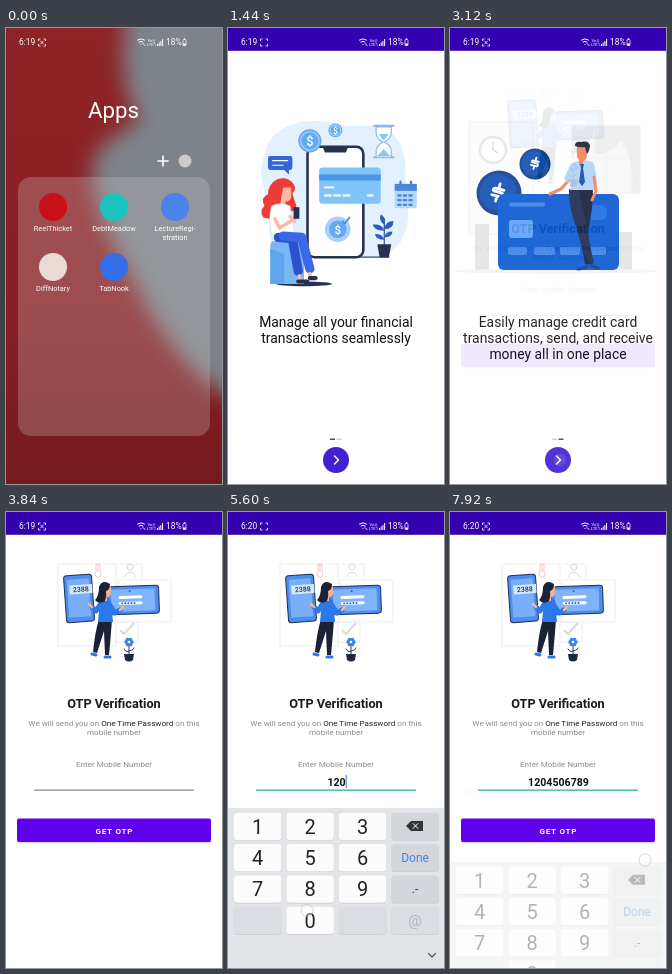
An HTML page for the animation above (8000 ms loop, 216 by 456 pixels).

```html
<!DOCTYPE html>
<html lang="en">
<head>
<meta charset="utf-8">
<title>Wallet app walkthrough</title>
<style>
html, body { margin: 0; width: 100%; height: 100%; overflow: hidden; background: #fff }
svg { display: block; width: 100vw; height: 100vh }
text { font-family: Roboto, sans-serif; text-anchor: middle }
.line { fill: none; stroke-linecap: round; stroke-linejoin: round }
.lead { font-size: 13.9px; fill: #111 }
.note { font-size: 8.1px; fill: #8a8a8a }
.label { font-size: 7.4px; fill: #fff }
.status { font-size: 8.4px; fill: #fff; text-anchor: start }
</style>
</head>
<body>
<svg viewBox="0 0 216 456">
<defs>
  <linearGradient id="red" x2="0" y2="1"><stop stop-color="#8d2428"/><stop offset=".6" stop-color="#8a1f23"/><stop offset="1" stop-color="#741a1d"/></linearGradient>
  <filter id="soft" x="-40%" y="-30%" width="180%" height="160%"><feGaussianBlur stdDeviation="10"/></filter>
  <clipPath id="frame"><rect id="frameBox" width="216" height="456"/></clipPath>
</defs>

<g id="home">
  <rect width="216" height="456" fill="url(#red)"/>
  <path filter="url(#soft)" fill="#7d8389" d="M124-30C114 20 114 66 134 92C116 106 90 112 86 142C88 190 112 222 132 262C152 304 180 340 216 366L260 380V-30Z"/>
  <g id="folder">
    <text x="107.500" y="90" font-size="22.300" fill="#fff">Apps</text>
    <path class="line" stroke="#fff" stroke-width="1.600" d="M152 133h10M157 128v10"/>
    <circle cx="179" cy="133" r="6.500" fill="#cfcaca"/>
    <rect x="12" y="149" width="192" height="259" rx="13" fill="#d0c8c8" fill-opacity=".27"/>
    <g id="icons"></g>
  </g>
</g>

<g id="app" clip-path="url(#frame)">
  <rect width="216" height="456" fill="#fff"/>
  <g id="intro">
    <g id="page1">
      <g transform="translate(108 228) scale(1.163) translate(-107.5 -230)">
        <path fill="#e3f0fd" d="M46 142C52 116 82 110 106 116C130 122 142 112 157 126C172 142 165 160 169 186C172 208 162 226 146 231H60C44 216 54 200 48 180C42 164 42 154 46 142Z"/>
        <path class="line" stroke="#3a4763" d="M68 231H153"/>
        <rect x="83" y="136" width="48" height="95" rx="6" fill="#fff" stroke="#27304f" stroke-width="2.200"/>
        <path fill="#27304f" d="M96 136h22l-2 5H98Z"/>
        <g fill="#65aaf0"><circle cx="85" cy="131" r="10"/><circle cx="107" cy="122" r="6"/><circle cx="109" cy="207" r="11" fill="#a9d1f8"/><circle cx="109" cy="207" r="7.500"/></g>
        <g class="line" stroke="#a9d1f8"><circle cx="85" cy="131" r="8"/><circle cx="107" cy="122" r="4.600"/><path stroke="#4789db" stroke-width="1.500" d="M113 200l2 2l4-5"/></g>
        <g fill="#fff" font-weight="500"><text x="85" y="135" font-size="11">$</text><text x="107" y="125" font-size="7.500">$</text><text x="109" y="211" font-size="10">$</text></g>
        <rect x="93" y="154" width="53" height="31" rx="3" fill="#80c4f9"/>
        <path fill="#4b96ea" d="M93 160h53v5H93Z"/>
        <path class="line" stroke="#e9f5ff" stroke-width="2" d="M98 171h7m-7 7h5m3 0h5m3 0h5m16 0h4"/>
        <g class="line" stroke="#8fb5e6"><path stroke-width="1.700" d="M140 118h17M140 145h17"/><path fill="#fff" d="M142 119v5q0 5 6 8q-6 3-6 8v5h13v-5q0-5-6-8q6-3 6-8v-5Z"/></g>
        <path fill="#8fc3f5" d="M144 125h9l-4.500 6ZM143 144l5.500-6l5.500 6Z"/>
        <path fill="#3566d8" d="M51 144h17q2 0 2 2v8q0 2-2 2h-1v4l-4-4H51q-2 0-2-2v-8q0-2 2-2Z"/>
        <path class="line" stroke="#fff" d="M53 148h13M53 152h9"/>
        <rect x="158" y="168" width="19" height="21" rx="2" fill="#b4d8fa"/>
        <path fill="#4a86dc" d="M158 168h19v6h-19Z"/>
        <path class="line" stroke="#4a86dc" stroke-width="2" stroke-dasharray="2 2.800" stroke-linecap="butt" d="M161 178h14M161 182h14M161 186h14M163 166v3m9-3v3"/>
        <path class="line" stroke="#2d4b8f" d="M149 220V198"/>
        <path fill="#2d5bc0" d="M149 203q-5-3-3-9q5 3 3 9ZM149 208q-8 1-10-5q8-1 10 5ZM149 207q1-7 8-7q0 7-8 7ZM149 216q-7 0-8-5q7 0 8 5ZM149 214q1-5 7-5q0 5-7 5Z"/>
        <path fill="#263252" d="M143 220h12l-2 11h-8Z"/>
        <ellipse cx="80" cy="254" rx="24" ry="2" fill="#27304f"/>
        <path fill="#79b8f4" d="M51 221q0-4 4-4h21q4 0 4 4v33H51Z"/>
        <path fill="#5da5ec" d="M51 224l12 4v26H51Z"/>
        <path fill="#ee3b35" d="M57 164q9-3 14 4q3 5-1 8l2 7q4 7-3 9l-6 3q-8 5-18 2q-4-6 1-10q-4-7 3-10q0-9 8-13Z"/>
        <path fill="#f8b9a2" d="M62 171h7v9q-2 4-5 3v5h-5Z"/>
        <path fill="#fff" stroke="#c9d9ee" stroke-width=".5" d="M52 187q8-4 16 0l4 24H52q-3-12 0-24Z"/>
        <path class="line" stroke="#f8b9a2" stroke-width="3" d="M55 198l4 8l13-8M68 196l4 4"/>
        <path fill="#222e52" d="M71 188h5v10h-5Z"/>
        <path class="line" stroke="#2b53cf" stroke-width="8" d="M58 214l12 1l5 28"/>
        <path class="line" stroke="#3b69e6" stroke-width="8" d="M62 213l16 1l7 27"/>
        <path class="line" stroke="#f8b9a2" stroke-width="3" d="M76 247v3m9-5v2"/>
        <path class="line" stroke="#27304f" stroke-width="3.500" d="M75 252h8M85 249h5"/>
      </g>
      <g class="lead"><text x="108" y="298.700">Manage all your financial</text><text x="108" y="314.700">transactions seamlessly</text></g>
    </g>
    <g id="page2"><g transform="translate(-7)">
      <g fill="none" stroke="#f2f2f2"><path fill="#fcfcfc" d="M26 94h64v112H26Z"/><path fill="#f8f8f8" d="M129 98h68v67h-68ZM163 98v67M130 130h66"/><path fill="#ededed" d="M152 98h45v67h-9q4-34-10-53q-8 14-26 14ZM129 98h23q-3 23-23 28Z"/></g>
      <circle cx="50" cy="122" r="13" fill="#fff" stroke="#e6e6e6" stroke-width="2.500"/>
      <path class="line" stroke="#c8c8c8" d="M50 114v8l5 3"/>
      <path fill="#e4e4e4" d="M32 196h14v46H32ZM176 204h13v38h-13Z"/>
      <ellipse cx="113" cy="243" rx="103" ry="2.500" fill="#f3f3f3"/>
      <g fill="#123f91"><circle cx="92" cy="136" r="15.500"/><circle cx="56" cy="165" r="22.500"/></g>
      <g fill="#1150b4"><circle cx="91" cy="135.500" r="12.500"/><circle cx="55" cy="164.500" r="18.500"/></g>
      <g id="coins" class="line" stroke="#fff"></g>
      <rect x="55" y="166" width="121" height="76" rx="6" fill="#0a58d2"/>
      <g fill="#3c83ec"><rect x="66" y="174.500" width="36" height="4" rx="2"/><rect x="66" y="192" width="24" height="18" rx="3" fill="#5ea0fb"/><rect x="145" y="177" width="19" height="15" rx="6" fill="#1c6be2"/><rect x="65" y="219" width="19" height="8" rx="2"/><rect x="91" y="219" width="21" height="8" rx="2"/><rect x="117" y="219" width="20" height="8" rx="2"/><rect x="143" y="219" width="20" height="8" rx="2"/></g>
      <path class="line" stroke="#f3805f" stroke-width="3.200" d="M128 150l-10 11l-11 5"/>
      <path fill="#131d3c" d="M126 161h24q0 22-5 40l2 35h-5l-6-34q-9-20-10-41Z"/>
      <path fill="#1c2950" d="M126 161h10q4 20 8 38q3 20 7 36l-4 2q-9-16-13-36q-8-18-8-40Z"/>
      <path class="line" stroke="#123f91" stroke-width="3.200" d="M135 241q5 0 9-3M148 238l7 2"/>
      <path fill="#b4d4fb" d="M130 135q9-5 20-1q5 12 3 28h-26l1-11q-1 3-3 4l-4-4q4-11 9-16Z"/>
      <path class="line" stroke="#f3805f" stroke-width="3" d="M151 149l2 14l-4 9"/>
      <path fill="#f3805f" d="M134 118h10v10q-1 5-4 5v4h-4v-5q-3-2-2-14Z"/>
      <path fill="#1f2038" d="M132 118q0-5 6-4q8-2 9 4q-1 6-3 8l-2-7q-5 1-10-1Z"/>
      <path fill="#174a9f" d="M137 136h4l-1 4l2 14l-3 4l-3-4l2-14Z"/>
      <g class="lead"><text x="115" y="298.700">Easily manage credit card</text><text x="115" y="314.700">transactions, send, and receive</text><text x="115" y="330.700">money all in one place</text></g>
    </g></g>
    <rect id="dot1" x="102" y="410.500" width="5" height="1.500"/>
    <rect id="dot2" x="108.500" y="410.500" width="5" height="1.500"/>
    <circle cx="108" cy="432" r="13" fill="#431fd2"/>
    <path class="line" stroke="#fff" stroke-width="1.500" d="M106.500 428l4 4l-4 4"/>
  </g>

  <g id="otp">
    <rect y="22" width="216" height="434" fill="#fff"/>
    <g fill="none" stroke="#ededed"><path d="M52 52h58v82H52ZM112 68h53v42h-53ZM114 52h22v16M108 110h24v20h-24"/><path stroke="#dadada" stroke-width="2" d="M114 118l4 4l10-11"/><circle cx="124" cy="55" r="3" stroke="#d7dce4"/><path stroke="#d7dce4" d="M118 65q6-10 12 0"/><path stroke="#f2c3c9" d="M92 52v8m-2 0a3 3 0 1 0 4 0V52h-4Z"/></g>
    <g transform="rotate(-4 72 86)">
      <rect x="59" y="63" width="28" height="47" rx="3" fill="#4b8df0" stroke="#1f2e4f"/>
      <rect x="62" y="67" width="22" height="38" rx="1" fill="#78aff8"/>
      <rect x="64" y="73" width="23" height="9" rx="1" fill="#d6e8ff"/>
      <text x="75.500" y="80" font-size="7" font-weight="500" fill="#253451">2388</text>
    </g>
    <g transform="rotate(-2 127 88)">
      <rect x="101" y="74" width="52" height="28" rx="3" fill="#4b8df0" stroke="#1f2e4f"/>
      <rect x="105" y="77" width="44" height="22" rx="1" fill="#80b4fa"/>
      <path class="line" stroke="#fff" stroke-width="3" d="M114 85h21M114 91h21"/>
      <path class="line" stroke="#2868d0" stroke-width="2" stroke-dasharray=".1 3" d="M116 91h15M124 79v1"/>
    </g>
    <path fill="#1b2136" d="M93 107h13q-1 15-3 36h-4l-1-24l-7 22l-4-1q2-20 6-33Z"/>
    <path class="line" stroke="#2b78e9" stroke-width="3" d="M86 142l4 1M99 145h5"/>
    <path class="line" stroke="#2b78e9" stroke-width="5" d="M95 91l-5 8l-4-4M103 92l6 9l5-3"/>
    <path class="line" stroke="#f5b29b" stroke-width="2.500" d="M86 95l-3-3M114 98l3-3"/>
    <path fill="#2b78e9" d="M94 87q6-3 11 1l2 22H92Z"/>
    <path fill="#f5b29b" d="M97 74h8v8q-2 4-4 3v4h-4Z"/>
    <path fill="#1b2136" d="M104 72q-8-5-11 3q0 9-4 13q4 5 10 1q2-5 1-10q4-1 4-7Z"/>
    <path class="line" stroke="#24406f" d="M123 146v-15m0 9q-4 0-5-3m5 2q4 0 5-3"/>
    <g id="petals" fill="#3c82ee"></g><circle cx="123" cy="130" r="1.300" fill="#fff"/>
    <path fill="#1d2742" d="M118 142h10l-1 6q-4 3-8 0Z"/>
    <text x="108" y="196" font-size="12.700" font-weight="700" fill="#191919">OTP Verification</text>
    <g class="note"><text x="108" y="214">We will send you on <tspan fill="#222">One Time Password</tspan> on this</text><text x="108" y="223">mobile number</text><text x="108" y="255">Enter Mobile Number</text></g>
    <text id="number" x="108.500" y="273.500" font-size="10.600" font-weight="700" fill="#111"></text>
    <rect id="caret" y="263" width="1.500" height="13" fill="#7b9fd6"/>
    <rect id="underline" x="28" y="277.500" width="160" height="1.300"/>
    <rect x="11" y="308" width="194" height="23.500" rx="2" fill="#000" opacity=".15"/>
    <rect x="11" y="306.500" width="194" height="23.500" rx="2" fill="#5f00ea"/>
    <text x="108.300" y="321.500" font-size="8.100" font-weight="700" letter-spacing=".75" fill="#fff">GET OTP</text>
  </g>
  <g id="keyboard">
    <rect y="296" width="216" height="160" fill="#e2e4e7"/>
    <g id="keys"></g>
    <path fill="#333" d="M178 314l5-5h12v10h-12Z"/>
    <path class="line" stroke="#fff" d="M185 311.500l5 5m0-5l-5 5"/>
    <path class="line" stroke="#555" stroke-width="1.200" d="M200.500 441.500l3.500 3.500l3.500-3.500"/>
  </g>
  <rect width="216" height="22.800" fill="#3500b0"/>
</g>

<circle id="touch" r="6" fill="#fff" fill-opacity=".6" stroke="#a8b3c8" stroke-width=".8"/>

<g>
  <text id="clock" class="status" x="13" y="17"></text>
  <g class="line" stroke="#fff" stroke-width=".8"><path stroke-linecap="butt" d="M32.500 13v-2h2m3 0h2v2m0 3v2h-2m-3 0h-2v-2"/><path id="rec" d="M34.500 13l3 3m0-3l-3 3"/></g>
  <path class="line" stroke="#fff" d="M131.500 12q3.500-2.500 7 0M133 14q2-1.500 4 0M135 16.500v.1M137 15.500l2 2"/>
  <g fill="#fff" font-size="4.300"><text x="145.500" y="13.500">Vo))</text><text x="145.500" y="18">LTE1</text></g>
  <path stroke="#fff" d="M151.500 18v-2m1.700 2v-3.500m1.700 3.500v-5m1.700 5v-7"/>
  <text class="status" x="160" y="17">18%</text>
  <rect x="177" y="11.500" width="3" height="6" rx=".6" fill="none" stroke="#fff" stroke-width=".7"/>
  <path fill="#fff" d="M177.800 10.200h1.400v1h-1.400ZM177.200 15.500h2.600v2h-2.600Z"/>
</g>
</svg>
<script>
const LOOP = 8000, PHONE = '1204506789';
const $ = id => document.getElementById(id);
const set = (id, attrs) => { for (const k in attrs) $(id).setAttribute(k, attrs[k]); };
const ramp = (t, start, length) => Math.min(1, Math.max(0, (t - start) / length));
const easeOut = (p, n) => 1 - (1 - p) ** n;
const move = (x, y) => `translate(${x} ${y})`;

const icons = [
  ['#c90f17', 'ReelThicket'], ['#1cc4bf', 'DebtMeadow'], ['#4a83ea', 'LectureRegi', 'stration'],
  ['#eadad6', 'DiffNotary'], ['#346fe8', 'TabNook']
];
$('icons').innerHTML = icons.map(([color, name, rest = ''], i) => {
  const x = 47 + i % 3 * 61, y = 179 + (i / 3 | 0) * 60;
  return `<circle cx="${x}" cy="${y}" r="14" fill="${color}"/>
    <text class="label" x="${x}" y="${y + 24}">${name}${rest && '-'}</text>
    <text class="label" x="${x}" y="${y + 33}">${rest}</text>`;
}).join('');

const coin = (x, y, s) => `<path stroke-width="2.6" transform="translate(${x} ${y}) scale(${s}) rotate(15)"
  d="M5-3H-2q-3 0-3 2q0 1 2 1H3q2 0 2 2q0 2-3 2H-5M0-8v4M0 5v4"/>`;
$('coins').innerHTML = coin(92, 135, .7) + coin(55, 164, 1.05);

$('petals').innerHTML = [0, 1, 2, 3, 4, 5].map(i =>
  `<circle cx="${123 + 2.8 * Math.cos(i * Math.PI / 3)}" cy="${130 + 2.8 * Math.sin(i * Math.PI / 3)}" r="1.9"/>`).join('');

const keyX = col => 29.6 + col * 52.5, keyY = row => 314.5 + row * 31.3;
const faces = ['1', '2', '3', '', '4', '5', '6', 'Done', '7', '8', '9', '.-', '', '0', '', '@'];
$('keys').innerHTML = faces.map((face, i) => {
  const x = keyX(i % 4), y = keyY(i / 4 | 0), digit = /\d/.test(face);
  const size = digit ? 20 : face == '@' ? 15 : 12;
  const ink = digit ? '#222' : face == 'Done' ? '#3f83de' : face == '@' ? '#b4b8be' : '#444';
  const fill = digit ? '#fcfcfd' : i > 11 ? '#dadde1' : '#d3d6da';
  return `<rect x="${x - 23.7}" y="${y - 13.2}" width="47.4" height="27.5" rx="3.5" fill="#c6c9ce"/>
    <rect x="${x - 23.7}" y="${y - 13.7}" width="47.4" height="27.4" rx="3.5" fill="${fill}"/>
    <text x="${x}" y="${y + size * .36}" font-size="${size}" fill="${ink}">${face}</text>`;
}).join('');

// Taps: release time, x, y, and how long the finger was down
const keyTimes = [5000, 5280, 5560, 5850, 6100, 6350, 6600, 6850, 7100, 7340];
const keyTaps = keyTimes.map((time, i) => {
  const n = +PHONE[i] || 11;
  const [dx, dy] = n == 11 ? [-3, -10] : [7, 3];
  return [time, keyX((n - 1) % 3) + dx, keyY((n - 1) / 3 | 0) + dy, 120];
});
const taps = [[200, 108, 239, 40], [2060, 110, 432, 120], [3040, 110, 432, 120],
  [4180, 110, 270, 100], ...keyTaps, [7890, 195, 348, 300]];

function draw(t) {
  // Launch from the folder
  const open = ramp(t, 280, 440), scale = .2 + .8 * easeOut(open, 1.74);
  set('home', { visibility: open < 1 ? 'visible' : 'hidden' });
  set('folder', { opacity: 1 - ramp(t, 200, 240) });
  set('app', {
    opacity: ramp(t, 200, 160),
    transform: `${move(108, 228 + 13 * (1 - scale))} scale(${scale}) ${move(-108, -228)}`
  });
  set('frameBox', { rx: 76 * (1 - open) });

  // Swipe to the second page
  const turn = easeOut(ramp(t, 2080, 320), 5);
  set('page1', { transform: move(-216 * turn, 0) });
  set('page2', { transform: move(216 * (1 - turn), 0) });
  set('dot1', { fill: turn < .5 ? '#4b4a55' : '#cfcfd4' });
  set('dot2', { fill: turn < .5 ? '#cfcfd4' : '#4b4a55' });

  // Sign-in screen
  const enter = ramp(t, 3080, 480);
  set('otp', { opacity: enter, transform: move(0, 12 * (1 - enter) ** 3) });
  const focused = t >= 4200, count = keyTimes.filter(time => time <= t).length;
  $('number').textContent = PHONE.slice(0, count);
  set('caret', { x: 108.3 + 3.05 * count, opacity: +(focused && t < 7700) });
  set('underline', { fill: focused ? '#2bb5a6' : '#8f8f8f' });

  // Keyboard slides up, then away
  const up = ramp(t, 4240, 340), down = ramp(t, 7680, 400);
  set('keyboard', {
    opacity: up * (1 - 1.1 * down),
    transform: move(0, 160 * (1 - up) ** 3 + 160 * down ** 2.15)
  });

  const tap = taps.find(([time, , , held]) => t >= time - held && t < time + 100);
  set('touch', tap
    ? { cx: tap[1], cy: tap[2], opacity: 1 - ramp(t, tap[0], 100) }
    : { opacity: 0 });

  $('clock').textContent = t < 4560 ? '6:19' : '6:20';
  set('rec', { opacity: +((t + 80) % 960 < 340) });
}

function tick() {
  draw(performance.now() % LOOP);
  requestAnimationFrame(tick);
}
tick();
</script>
</body>
</html>
```
